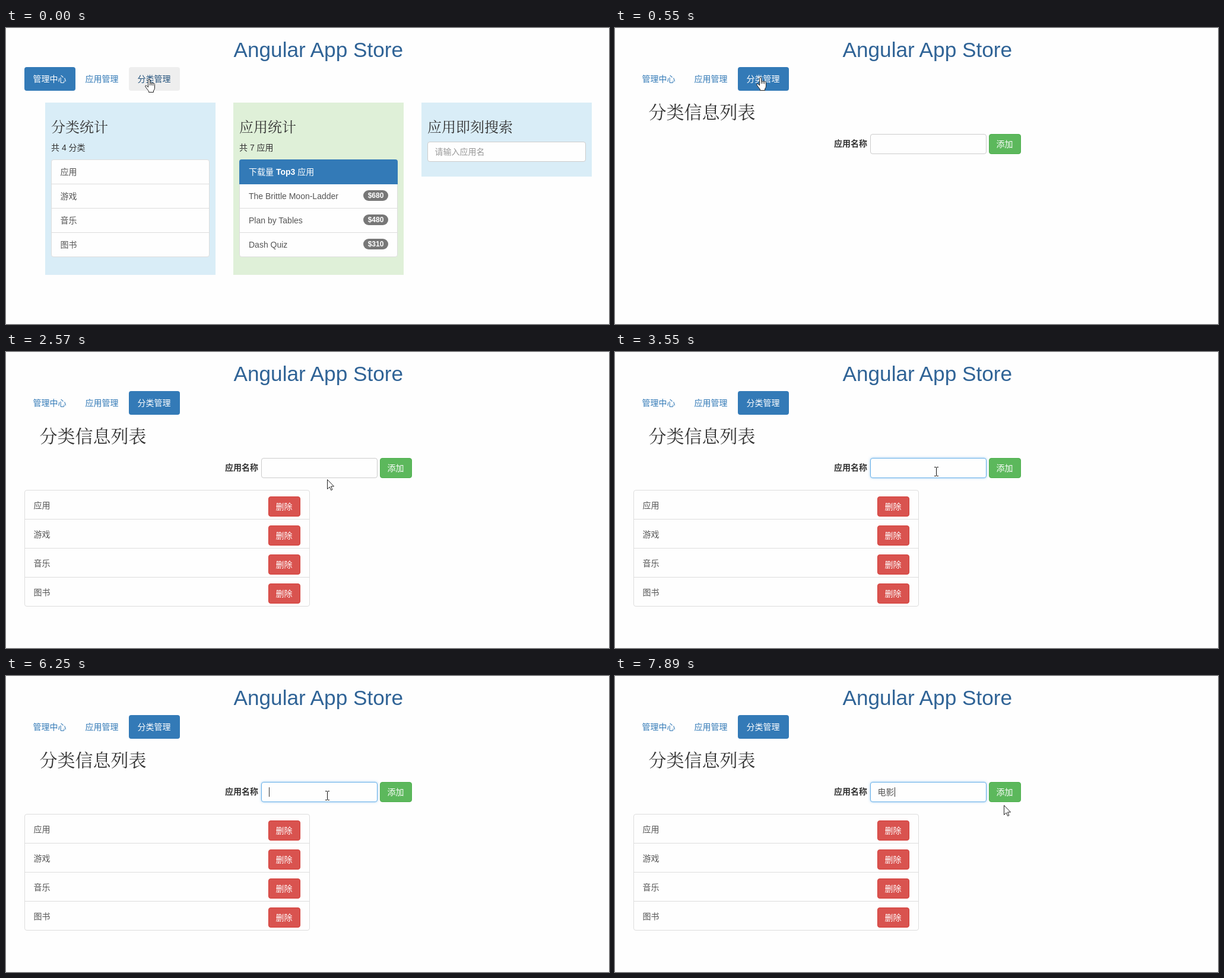
An HTML page for the animation above (8000 ms loop, 1016 by 500 pixels).

```html
<!DOCTYPE html>
<html lang="zh">
<head>
<meta charset="utf-8">
<title>Angular App Store</title>
<style>
html, body { margin: 0; width: 100%; height: 100%; overflow: hidden; background: #fefefe; }
svg { display: block; font-family: "Liberation Sans", "Noto Sans CJK SC", "Noto Sans CJK", sans-serif; }
.heading { font-family: "Noto Serif CJK SC", "Noto Sans CJK SC", "Noto Sans CJK", serif; font-weight: 200; }
.mono { font-family: "Noto Sans Mono CJK SC", "Liberation Mono", monospace; }
.focus { filter: drop-shadow(0 0 2px rgba(102, 175, 233, .6)); }
</style>
</head>
<body>
<svg id="stage" width="1016" height="500" viewBox="0 0 1016 500"></svg>
<script>
const BLUE = '#337ab7', WHITE = '#fefefe';
const LOOP = 8000;
const categories = ['应用', '游戏', '音乐', '图书'];

// Text is placed by its left edge and vertical centre.
const text = (x, cy, s, fill = '#333', size = 14, extra = '') =>
  `<text x="${x}" y="${Math.round(cy + size * 0.37)}" fill="${fill}" font-size="${size}" ${extra}>${s}</text>`;
const rect = (x, y, w, h, fill, r = 0, extra = '') =>
  `<rect x="${x}" y="${y}" width="${w}" height="${h}" rx="${r}" fill="${fill}" ${extra}/>`;
const frame = (x, y, w, h, fill, stroke, r = 4, extra = '') =>
  rect(x + .5, y + .5, w - 1, h - 1, fill, r - .5, `stroke="${stroke}" ${extra}`);
const line = (x1, y1, x2, y2, stroke) =>
  `<path d="M${x1} ${y1}L${x2} ${y2}" stroke="${stroke}" fill="none"/>`;
const heading = (x, cy, s, size) => text(x, cy, s, '#333', size, 'class="heading"');
const button = (x, y, label, fill, stroke) =>
  frame(x, y, 54, 34, fill, stroke) + text(x + 12.5, y + 17, label, '#fff');

function list(x, y, w, rowHeight, rows) {
  let out = frame(x, y, w, rowHeight * rows + 1, WHITE, '#ddd');
  for (let i = 1; i < rows; i++) {
    const ly = y + i * rowHeight + .5;
    out += line(x, ly, x + w, ly, '#ddd');
  }
  return out;
}

function tabs(active, hovered) {
  return ['管理中心', '应用管理', '分类管理'].map((label, i) => {
    const x = 31 + i * 88;
    const fill = i === active ? BLUE : i === hovered ? '#eee' : 'none';
    const ink = i === active ? '#fff' : i === hovered ? '#23527c' : BLUE;
    return rect(x, 66, 86, 40, fill, 4) + text(x + 14.5, 86, label, ink);
  }).join('');
}

function dashboard() {
  const apps = [['The Brittle Moon-Ladder', 680], ['Plan by Tables', 480], ['Dash Quiz', 310]];
  let out = rect(66, 126, 287, 291, '#d9edf7') + rect(383, 126, 287, 291, '#dff0d8') +
    rect(700, 126, 287, 125, '#d9edf7') +
    heading(76, 167, '分类统计', 24) + heading(393, 167, '应用统计', 24) +
    heading(710, 167, '应用即刻搜索', 24) +
    text(76, 202, '共 4 分类') + text(393, 202, '共 7 应用') +
    list(76, 222, 267, 41, 4) + list(393, 222, 267, 41, 4) +
    rect(393, 222, 267, 42, BLUE, 4) + rect(393, 250, 267, 14, BLUE) +
    text(409, 243, '下载量 <tspan font-weight="bold">Top3</tspan> 应用', '#fff') +
    frame(710, 192, 267, 34, WHITE, '#ccc') + text(722.5, 209, '请输入应用名', '#999');
  categories.forEach((name, i) => out += text(91.5, 243 + i * 41, name, '#555'));
  apps.forEach(([name, price], i) => {
    const cy = 284 + i * 41;
    out += text(409, cy, name, '#555') + rect(602, cy - 10, 42, 18, '#777', 9) +
      text(623, cy - 1, '$' + price, '#fff', 12, 'font-weight="bold" text-anchor="middle"');
  });
  return out;
}

function categoryPage(t) {
  const focused = t >= 2970;
  let out = heading(56.5, 142, '分类信息列表', 30) +
    text(369, 195, '应用名称', '#333', 14, 'font-weight="bold"') +
    frame(430, 179, 196, 34, WHITE, focused ? '#66afe9' : '#ccc', 4, focused ? 'class="focus"' : '') +
    button(630, 179, '添加', '#5cb85c', '#4cae4c');
  if (t >= 1010) {
    out += list(31, 233, 481, 49, 4);
    categories.forEach((name, i) => {
      const hover = i === 0 && t >= 2300 && t < 2450;
      out += text(46.5, 259 + i * 49, name, '#555') +
        button(442, 244 + i * 49, '删除', hover ? '#c9302c' : '#d9534f', hover ? '#ac2925' : '#d43f3a');
    });
  }
  if (t >= 7620) out += text(442.5, 196, '电影', '#555');
  return out;
}

// Latest entry whose start time has passed.
const latest = (steps, t) => steps.filter(s => s[0] <= t).pop();

const caretToggles = [2970, 3550, 4080, 4610, 5170, 5850, 6250, 6800, 7190];
function caret(t) {
  const on = caretToggles.filter(s => s <= t).length % 2 === 1;
  return on ? rect(t >= 7620 ? 471 : 443, 188, 1, 16, '#333') : '';
}

const compositions = [
  [0, ''],
  [5850, 'd', '的 都 到 大 ・', 297],
  [6250, ''],
  [6530, 'd', '的 都 到 大 ・', 297],
  [6650, 'di', '第 地 低 底 ・', 297],
  [6800, 'dian', '点 电 店 垫 ・', 297],
  [7070, 'diany', '电影 电源 店员 电压 点', 377],
  [7190, 'dianying', '电影 电影院 电 点 店', 377],
  [7620, '']
];
const glyphWidth = { d: .611, i: .278, a: .556, n: .611, y: .556, g: .611 };

function inputMethod(t) {
  const [, typed, words, width] = latest(compositions, t);
  if (!typed) return '';
  const right = 443 + width;
  const typedWidth = [...typed].reduce((sum, c) => sum + glyphWidth[c] * 16, 0);
  let out = frame(443, 204, width, 56, '#fbfdff', '#a9bfd0', .5) +
    line(444, 231.5, right - 32, 231.5, '#c3d8e6') +
    text(454, 218, typed, '#0b64c4', 16, 'font-weight="bold"') +
    rect(Math.round(454 + typedWidth), 209, 1, 18, '#a22') +
    rect(right - 31, 206, 29, 28, '#f6a481');
  let x = 454;
  words.split(' ').forEach((word, i) => {
    const ink = i ? '#0a78cc' : '#d40000';
    out += text(x, 245, `${i + 1}.${word}`, ink, 16, 'class="mono"');
    x += 16 + word.length * 16 + 13;
  });
  const px = right - 61;
  return out + frame(px, 238, 15, 15, '#f4faff', '#bfdcef', .5) +
    frame(px + 14, 238, 15, 15, '#f4faff', '#a5cdea', .5) +
    `<path d="M${px + 9} 242.500v6l-3-3z" fill="#a9c9df"/><path d="M${px + 20} 242.500v6l3-3z" fill="#1c83d0"/>`;
}

const pointers = {
  arrow: '<path d="M.5 .5V16.500L4.200 13L6.700 18.500L8.900 17.500L6.500 12H11.500Z" fill="#fff" stroke="#222"/>',
  hand: '<path d="M5.500 14V2a1.500 1.500 0 0 1 3 0V7.500a1.400 1.400 0 0 1 2.700 .3a1.300 1.300 0 0 1 2.700 .7a1.300 1.300 0 0 1 2.600 1V15q0 3-2 5V22.500H6.500V20.500Q3.500 17 .8 13Q.3 11 2.300 11Z" fill="#fff" stroke="#222"/>' +
    '<path d="M8.500 7.500V11M11.200 8V11M13.900 9V11.500" stroke="#222" fill="none"/>',
  beam: '<path d="M0 .5H3M4 .5H7M3.500 1V15M0 15.500H3M4 15.500H7" stroke="#111" fill="none"/>'
};
const pointerSteps = [
  [0, 'hand', 234, 86], [150, 'hand', 238, 83],
  [1010, 'hand', 237, 87], [1160, 'hand', 236, 97], [1280, 'arrow', 237, 122],
  [1400, 'arrow', 230, 155], [1520, 'arrow', 220, 200], [1640, 'arrow', 210, 256],
  [1760, 'arrow', 201, 321], [1910, 'arrow', 201, 434],
  [2060, 'arrow', 222, 438], [2180, 'arrow', 345, 370], [2300, 'hand', 460, 254],
  [2450, 'arrow', 520, 236], [2570, 'arrow', 541, 215], [2690, 'beam', 538, 194],
  [7740, 'beam', 587, 188], [7890, 'arrow', 655, 218]
];
function pointer(t) {
  const [, shape, x, y] = latest(pointerSteps, t);
  return `<g transform="translate(${x} ${y})">${pointers[shape]}</g>`;
}

const stage = document.getElementById('stage');
let shown = '';
function draw(t) {
  // The tab switches on click; its view follows once loaded.
  const clicked = t >= 430, loaded = t >= 550;
  const markup = rect(0, 0, 1016, 500, WHITE) +
    text(383.5, 36, 'Angular App Store', '#2f6396', 35.2) +
    tabs(clicked ? 2 : 0, clicked ? -1 : 2) +
    (loaded ? categoryPage(t) : dashboard()) +
    caret(t) + inputMethod(t) + pointer(t);
  if (markup !== shown) stage.innerHTML = shown = markup;
}
function tick() {
  draw(performance.now() % LOOP);
  requestAnimationFrame(tick);
}
tick();
</script>
</body>
</html>
```
